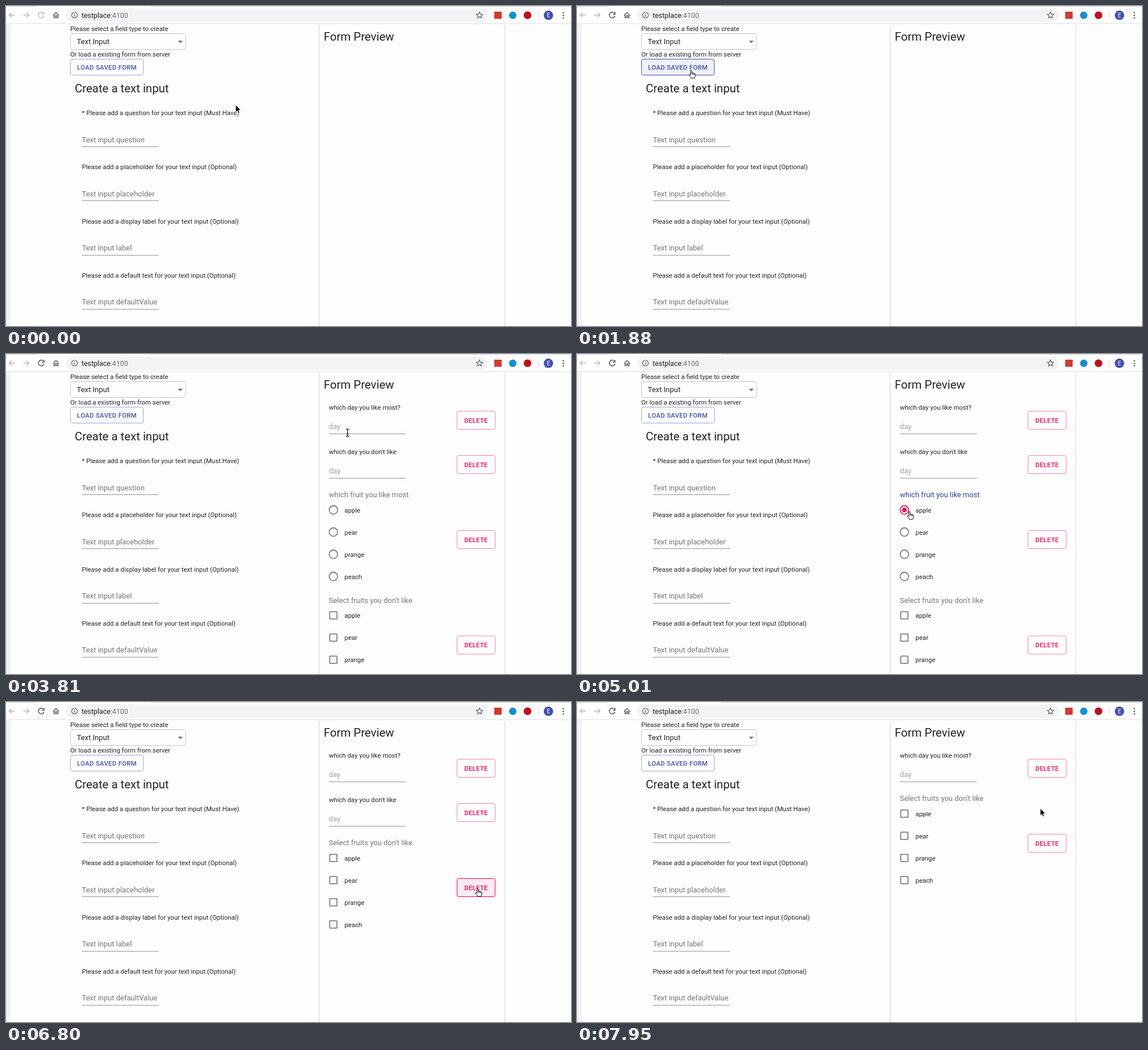
An HTML page that plays this animation: 994x563 px, repeating every 8000 ms.

```html
<!DOCTYPE html>
<html lang="en">
<head>
<meta charset="utf-8">
<title>Form builder</title>
<style>
  html, body { margin: 0; width: 100%; height: 100%; overflow: hidden; background: #fefefe; }
  svg { display: block; font-family: Roboto, sans-serif; }
  text { white-space: pre; }
  .button { font-size: 11.3px; font-weight: 500; letter-spacing: .0286em; text-anchor: middle; }
  .paper { filter: drop-shadow(0 1px 1.3px rgba(0, 0, 0, .36)); }
  .icon { fill: none; stroke: #5f6368; stroke-width: 1.5; }
</style>
</head>
<body>
<svg width="994" height="563" viewBox="0 0 994 563">
  <rect y="31" width="8" height="532" fill="#f1f2f3"/>
  <rect class="paper" x="551.5" y="32" width="325.5" height="560" fill="#fefefe"/>
  <rect width="994" height="31" fill="#fff"/>
  <path d="M0 0H56Q54 1.5 50 1.5H0ZM252 0H994V1.5H258Q254 1.5 252 0Z" fill="#dee1e6"/>
  <rect y="30.5" width="994" height="1" fill="#dcdddf"/>
  <rect x="106" y="4.5" width="742" height="23.5" rx="11.75" fill="#f1f3f4"/>
  <g class="icon">
    <path d="M15.5 16H5.5M10 11.5L5.5 16 10 20.5M30.5 16H40.5M36 11.5L40.5 16 36 20.5" stroke="#b9bbbe"/>
    <path d="M83 16.5L88 11.5 93 16.5M84.5 15.5V20.8H86.7V17.3H89.3V20.8H91.5V15.5"/>
    <circle cx="120.5" cy="16" r="5" stroke-width="1.2"/>
    <path d="M120.5 15.3V18.8M120.5 13V14.3" stroke-width="1.3"/>
    <path d="M833 10.6L834.6 14.2 838.5 14.6 835.6 17.2 836.4 21 833 19 829.6 21 830.4 17.2 827.5 14.6 831.4 14.2Z" stroke-width="1.2"/>
  </g>
  <text x="133" y="20.5" font-size="12.4" fill="#202124">testplace<tspan fill="#6b6f74">:4100</tspan></text>
  <rect x="859" y="10" width="13" height="12.5" fill="#d23a2e"/>
  <circle cx="891.5" cy="16.3" r="6.5" fill="#118fd8"/>
  <circle cx="917.5" cy="16.3" r="6.7" fill="#c30d1c"/>
  <path d="M936.5 10V22" stroke="#d3d5d8"/>
  <circle cx="954.3" cy="16.3" r="8.3" fill="#4150b0"/>
  <text x="954.3" y="20" font-size="10" fill="#fff" text-anchor="middle">E</text>
  <g fill="#5f6368"><circle cx="980.5" cy="11.8" r="1.4"/><circle cx="980.5" cy="16.3" r="1.4"/><circle cx="980.5" cy="20.8" r="1.4"/></g>
  <clipPath id="loadClip"><rect x="113" y="93" width="129" height="29" rx="3.5"/></clipPath>
  <g id="form"></g>
  <g id="live"></g>
</svg>
<script>
const LOOP = 8000, INK = '#222', GREY = '#757575', BLUE = '#3f51b5', PINK = '#f50057';
const form = document.getElementById('form'), live = document.getElementById('live');

const text = (x, y, s, size = 11.4, fill = INK) =>
  `<text x="${x}" y="${y}" font-size="${size}" fill="${fill}">${s}</text>`;
const rule = (x, y, color = '#949494', h = 1) =>
  `<rect x="${x}" y="${y}" width="135.5" height="${h}" fill="${color}"/>`;
const button = (x, y, w, h, label, color, tint) =>
  `<rect x="${x}" y="${y}" width="${w}" height="${h}" rx="3" fill="${color}" fill-opacity="${tint}"
    stroke="${color}" stroke-opacity="${tint ? 1 : .5}"/>
  <text class="button" x="${x + w / 2}" y="${y + h / 2 + 4}" fill="${color}">${label}</text>`;
const disc = (x, y, r, color, alpha, extra = '') =>
  `<circle cx="${x}" cy="${y}" r="${r}" fill="${color}" fill-opacity="${alpha}" ${extra}/>`;

const fields = [
  ['* Please add a question for your text input (Must Have)', 'question'],
  ['Please add a placeholder for your text input (Optional)', 'placeholder'],
  ['Please add a display label for your text input (Optional)', 'label'],
  ['Please add a default text for your text input (Optional)', 'defaultValue']
];
form.innerHTML =
  text(113, 44, 'Please select a field type to create') +
  '<rect x="113.5" y="48.5" width="202.5" height="28" rx="3.5" fill="none" stroke="#c4c4c4"/>' +
  text(124.5, 67, 'Text Input', 13) +
  '<path d="M302.3 61H311L306.6 65.4Z" fill="#757575"/>' +
  text(113, 89, 'Or load a existing form from server') +
  text(121, 151.5, 'Create a text input', 20.4) +
  text(559, 61, 'Form Preview', 20.4) +
  fields.map(([hint, name], i) => {
    const y = i * 95.25;
    return text(133.5, 192 + y, hint) + text(133.5, 239.5 + y, 'Text input ' + name, 13, GREY) +
      rule(133.5, Math.round(247 + y));
  }).join('');

// Pointer moves: first step, last step, step count, destination
const moves = [
  [120, 120, 1, 404.5, 175], [300, 420, 2, 415, 132], [930, 1170, 3, 287, 118],
  [1520, 1880, 4, 201, 113], [2240, 2240, 1, 200, 112.5], [3190, 3420, 3, 605, 145],
  [3810, 3810, 1, 601, 138.5], [4270, 4510, 3, 592, 314], [4630, 4750, 2, 587, 305],
  [5010, 5010, 1, 585, 277], [5400, 5400, 1, 590, 333], [5550, 5790, 3, 775, 300],
  [5910, 6020, 2, 831, 329], [6380, 6380, 1, 830, 328], [7070, 7310, 3, 815, 188],
  [7950, 7950, 1, 815, 187]
];

function pointer(t) {
  let x = 404, y = 174;
  for (const [from, to, n, tx, ty] of moves) {
    if (t < from) break;
    const gap = n > 1 ? (to - from) / (n - 1) : 1;
    const k = Math.min(n, Math.floor((t - from) / gap + 1e-6) + 1) / n;
    x += (tx - x) * k;
    y += (ty - y) * k;
  }
  return [x, y];
}

const shapes = {
  arrow: '<path d="M0 0V13.2L3 10.5 5 15 7.1 14.1 5.1 9.6H9.2Z" stroke="#fff" stroke-width=".9"/>',
  hand: `<path d="M-1.3 1.2C-1.3-.4 1.1-.4 1.1 1.2V5.2C1.3 4 3.2 4.2 3.2 5.6 3.6 4.6 5.2 4.9 5.2 6.2
    5.7 5.5 7 5.8 7 7V10C7 12 5.8 12.6 5.6 14H-.2C-.6 12.6-2.4 11.3-3.7 8.7-4.3 7.3-2.8 6.7-1.3 8.6Z
    M1.1 5V7.5M3.2 5.6V7.7M5.2 6.2V8" fill="#fff" stroke="#000"/>`,
  beam: `<path d="M-3-6.5Q0-6.5 0-5 0-6.5 3-6.5M0-5V5M-3 6.5Q0 6.5 0 5 0 6.5 3 6.5M-1.6 2H1.6"
    fill="none" stroke="#000" stroke-width="1.2"/>`
};

const within = (v, a, b) => v >= a && v < b;
const fruits = ['apple', 'pear', 'prange', 'peach'];

function input(y, label, hovered) {
  return text(568, y + 98, label) + text(568, y + 132, 'day', 13, '#a2a2a2') +
    (hovered ? rule(568, y + 139.5, INK, 2) : rule(568, y + 140));
}

function group(y, label, radio, t) {
  const active = radio && within(t, 5010, 6650);
  let out = text(568, y + 96, label, 13, active ? '#303f9f' : GREY);
  fruits.forEach((fruit, i) => {
    const cy = y + 118.3 + i * 39, on = radio && !i && t >= 5010;
    const line = `fill="none" stroke="${on ? PINK : '#6e6e6e'}" stroke-width="1.6"`;
    out += radio ? `<circle cx="576" cy="${cy}" r="7.4" ${line}/>`
      : `<rect x="569.5" y="${cy - 6.3}" width="12.8" height="12.8" rx=".8" ${line}/>`;
    if (on) {
      out += disc(576, cy, 4, PINK, 1);
      if (within(t, 5130, 5400)) out += disc(576, cy, t < 5250 ? 12 : 18.5, PINK, .12);
    }
    out += text(595.5, cy + 4.2, fruit);
  });
  return out;
}

function draw(t) {
  const [px, py] = pointer(t);
  let kind = within(px, 113, 242) && within(py, 93, 122) ? 'hand' : 'arrow';

  const loadTint = t < 1640 ? 0 : t < 2740 ? .08 : t < 3190 ? .16 : t < 3570 ? .1 : 0;
  let out = button(113.5, 93.5, 128, 28, 'LOAD SAVED FORM', BLUE, loadTint);
  if (within(t, 2470, 2740))
    out += disc(200, 113, t < 2590 ? 36 : 62, BLUE, .1, 'clip-path="url(#loadClip)"');

  const items = [];
  if (t >= 2740) {
    items.push(['input', 'which day you like most?']);
    if (t < 7950) items.push(['input', "which day you don't like"]);
    if (t < 6800) items.push(['radio', 'which fruit you like most']);
    items.push(['check', "Select fruits you don't like"]);
  }
  let y = 0;
  items.forEach(([type, label], i) => {
    const isInput = type === 'input';
    const mid = y + (isInput ? 116.5 : 170.5);
    if (isInput) {
      out += input(y, label, !i && within(t, 3930, 4270));
      if (within(px, 568, 704) && within(py, y + 119, y + 141)) kind = 'beam';
    } else {
      out += group(y, label, type === 'radio', t);
      if (within(px, 556, 632) && within(py, y + 99, y + 255)) kind = 'hand';
    }
    if (within(px, 793, 861) && within(py, mid - 16.5, mid + 16.5)) kind = 'hand';
    const hovered = i === 2 && within(t, 6020, 7070) || i === 1 && within(t, 7510, 7950);
    out += button(793.5, mid - 16, 67, 32, 'DELETE', PINK, hovered ? .08 : 0);
    if (i === 1 && within(t, 7810, 7950)) out += disc(816, mid - 4, 12, PINK, .13);
    y += isInput ? 78 : 185.5;
  });

  out += `<path class="icon" style="stroke:${t < 930 ? '#b9bbbe' : '#505458'}"
    d="M65.8 12.6A5 5 0 1 0 66.8 17.3M66.9 10.7V14.6H63"/>`;
  return out + `<g transform="translate(${px} ${py})">${shapes[kind]}</g>`;
}

let shown = '';
const start = performance.now();
function tick() {
  const next = draw((performance.now() - start) % LOOP);
  if (next !== shown) live.innerHTML = shown = next;
  requestAnimationFrame(tick);
}
tick();
</script>
</body>
</html>
```
